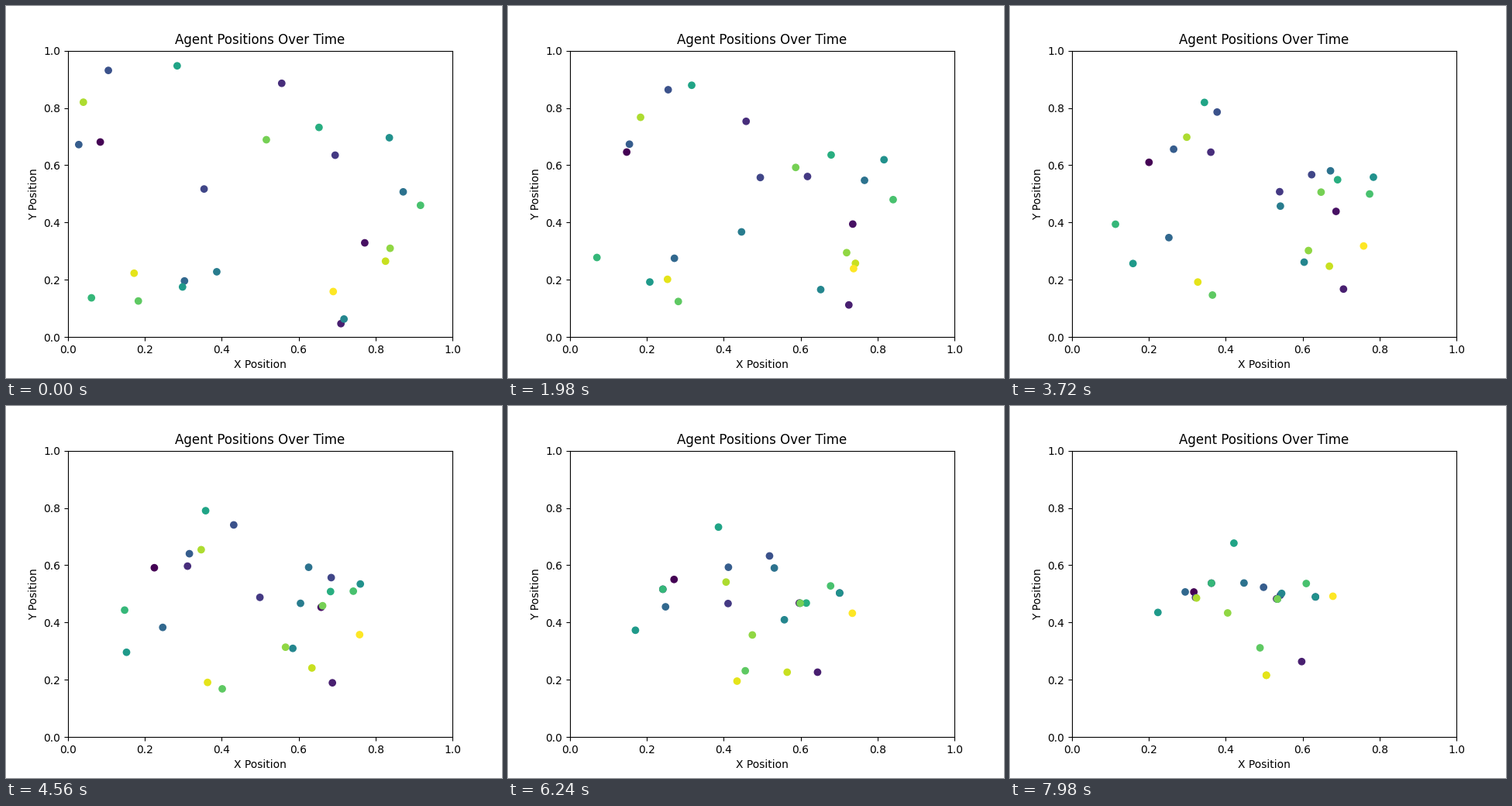
A matplotlib script for the animation above (8000 ms loop, 640x480 px).

```python
import numpy as np
import matplotlib.pyplot as plt
from matplotlib.animation import FuncAnimation

TICK = 20        # ms per drawn frame
HOLD = 3         # drawn frames per simulation step
FRAMES = 400

# per agent: start x, start y, speed in thousandths, index of its quarry
AGENTS = [
    (.084, .681, 2.20, 20), (.772, .329, 2.28, 3), (.710, .047, 2.05, 20),
    (.556, .886, 5.00, 16), (.695, .635, 3.25, 8), (.354, .517, 4.45, 12),
    (.105, .931, 5.00, 15), (.028, .672, 3.84, 15), (.303, .196, 2.58, 0),
    (.872, .507, 3.43, 21), (.387, .228, 4.60, 19), (.718, .063, 3.70, 6),
    (.836, .696, 2.40, 1), (.298, .175, 2.85, 16), (.284, .947, 2.28, 11),
    (.653, .732, 3.02, 1), (.061, .137, 4.29, 7), (.917, .460, 2.39, 7),
    (.183, .126, 3.00, 11), (.516, .689, 3.64, 1), (.838, .310, 3.62, 16),
    (.040, .820, 4.64, 4), (.826, .265, 2.54, 23), (.172, .223, 2.56, 2),
    (.690, .159, 2.83, 17),
]


def walk(pos):
    """Each agent in turn steps towards its quarry, stopping once there."""
    pos = pos.copy()
    for i, (_, _, speed, quarry) in reversed(list(enumerate(AGENTS))):
        gap = pos[quarry] - pos[i]
        dist = max(np.hypot(*gap), 1e-9)
        pos[i] += gap * min(1, speed / 1000 / dist)
    return pos


path = [np.array([agent[:2] for agent in AGENTS])]
for _ in range(FRAMES // HOLD):
    path.append(walk(path[-1]))

fig, ax = plt.subplots(figsize=(6.4, 4.8), dpi=100)
dots = ax.scatter(*path[0].T, c=range(len(AGENTS)), cmap="viridis")
ax.set(xlim=(0, 1), ylim=(0, 1), title="Agent Positions Over Time",
       xlabel="X Position", ylabel="Y Position")


def update(i):
    dots.set_offsets(path[i // HOLD])
    return dots,


def reset():
    return update(0)


anim = FuncAnimation(fig, update, frames=FRAMES, init_func=reset,
                     interval=TICK, repeat=True, repeat_delay=0, blit=True)
plt.show()
```
